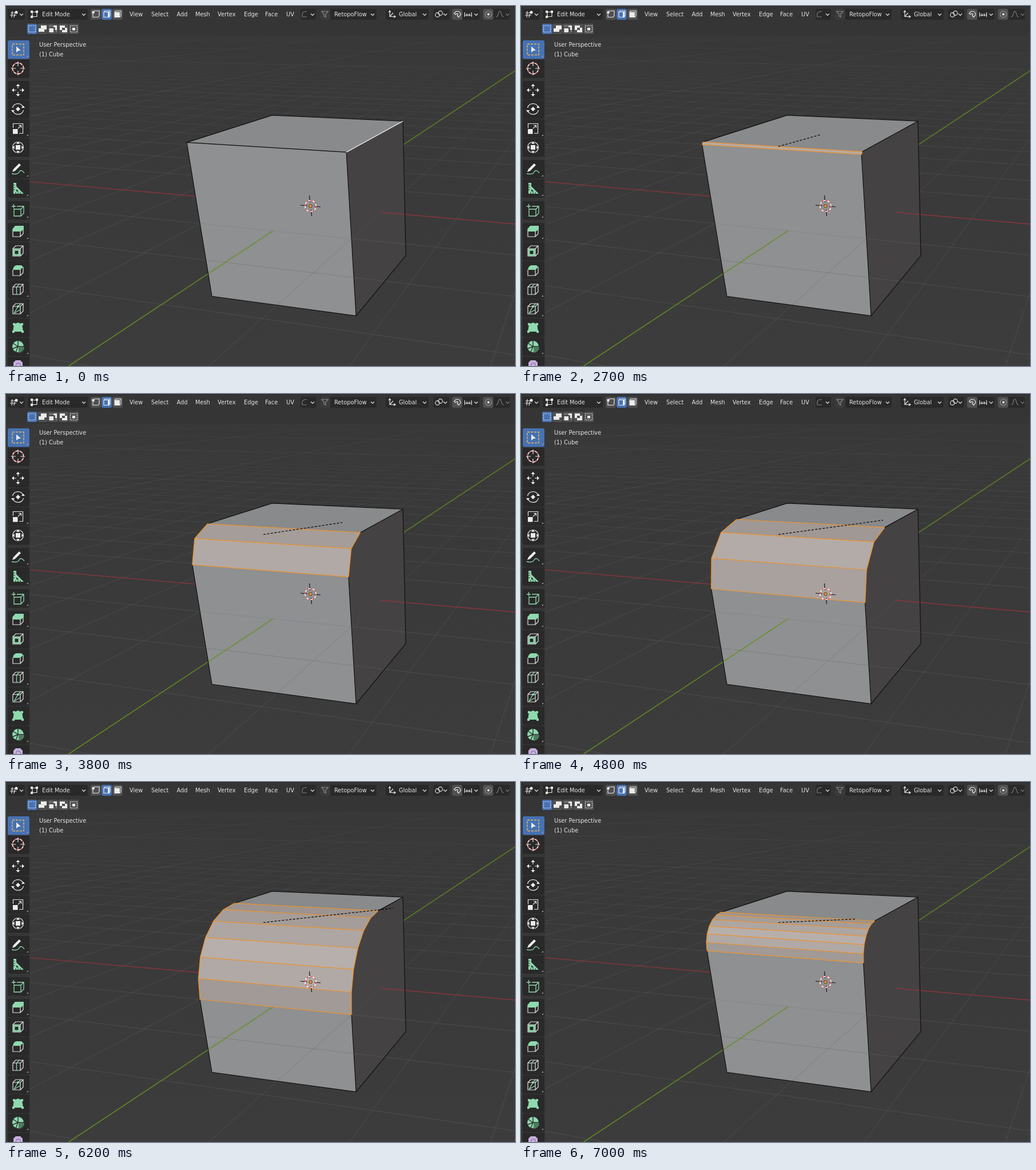
These frames come from a looping animation (890x629 px, 8000 ms). An HTML page with a canvas:

```html
<!DOCTYPE html>
<html lang="en">
<head>
<meta charset="utf-8">
<title>Bevel</title>
<style>
html, body { margin: 0; width: 100%; height: 100%; overflow: hidden; background: #393939; }
canvas, svg { position: absolute; left: 0; top: 0; }
text { font: 9.8px "DejaVu Sans", sans-serif; fill: #e6e6e6; }
.line { fill: none; stroke: #e4e4e4; stroke-width: 1.2; }
.white { fill: #ececec; }
.green { fill: #8fd9ae; }
.gline { fill: none; stroke: #8fd9ae; stroke-width: 1.3; }
.dim { opacity: .45; }
</style>
</head>
<body>
<canvas id="view" width="890" height="629"></canvas>
<svg width="890" height="629">
  <defs>
    <path id="chev" class="line" d="M-3-1.5L0 1.5 3-1.5"/>
    <path id="box" class="line" d="M-9-4H4V9H-9zM-9-4L-4-9H9V4L4 9M4-4L9-9"/>
    <g id="ring" fill="none">
      <circle r="9.7" stroke="#fff" stroke-width="1.6"/>
      <circle r="9.7" stroke="#d8434c" stroke-width="1.6" pathLength="16" stroke-dasharray="1"/>
    </g>
    <path id="arrows" class="white" d="M0-11L3.5-7H-3.5zM0 11L3.5 7H-3.5zM-11 0L-7-3.5V3.5zM11 0L7-3.5V3.5z"/>
  </defs>

  <!-- 3D cursor -->
  <g transform="translate(532.5 349.5)">
    <path d="M-2-18.500L-1-7M1 7L2 17.500M-17.500-1.500L-6-.5M7 .5L17.500 1.500" stroke="#111" stroke-width="1.2"/>
    <use href="#ring"/>
    <circle r="2.700" fill="#f59a32" stroke="#46331d"/>
  </g>

  <g id="ui"></g>

  <!-- header icons -->
  <path class="line" d="M8 12H17M7 16H18M11 9L10 20M15 14L14 20"/>
  <circle class="white" cx="18" cy="11" r="2.600"/>
  <path class="line" d="M46 10.500H54V18.500H46z"/>
  <path class="white" d="M43 8h4v4h-4zM52 8h4v4h-4zM43 17h4v4h-4z"/>
  <path class="line" d="M152 10.500L155 8.500H163V17L161 19.500H152z"/>
  <rect class="white" x="150.500" y="9" width="4" height="4"/>
  <path class="line" d="M171 10.500L173 8.500H182V17L180 19.500H171zM171 10.500H180"/>
  <path d="M179.500 10V20" stroke="#fff" stroke-width="2.500"/>
  <path class="line" d="M190 10.500L192 8.500H201V17L199 19.500"/>
  <rect class="white" x="189.500" y="10.500" width="9.500" height="9.500"/>
  <path class="line dim" d="M518 19V14Q518 9.500 526 9.500M518 19H526"/>
  <path class="line dim" d="M552 9.500H563L559 14V19.500L556 17.500V14z"/>
  <path class="line" d="M671 9V18.500H680M671 18.500L677 12M669 11L671 8 673 11M678 16.500L681 18.500 678 20.500"/>
  <circle class="line" cx="754.500" cy="15.500" r="3.800"/>
  <circle class="line" cx="759.500" cy="12.500" r="3.800"/>
  <path class="line" d="M783.500 13L787 9.500Q794 8 795 15L791.500 19.500 789 17Q792 13 787.500 13.500L786 15z"/>
  <path class="line" d="M802 11V19M802 16H814M806 13V18M810 13V18M814 11V19"/>
  <circle class="line dim" cx="843.500" cy="14.500" r="5.500"/>
  <circle class="white" cx="843.500" cy="14.500" r="2"/>
  <path class="line dim" d="M857 19C862 19 860 9 863.500 9S865 19 870 19"/>

  <!-- selection modes -->
  <rect class="line" x="39.500" y="34.500" width="12" height="11" stroke-dasharray="2 1.500"/>
  <path class="white" d="M61 34H71V41H67V45H57V39H61z"/>
  <path class="line" d="M76 35H88V45" stroke-dasharray="2 1.500"/>
  <path class="white" d="M75.500 39H83V46H75.500zM83 34H89V42H86V37H83z"/>
  <path class="white" fill-rule="evenodd" d="M94 34H103V38H107V46H98V42H94zM98 38V42H103V38z"/>
  <rect class="line" x="112.500" y="34.500" width="12" height="11" stroke-dasharray="2 1.500"/>
  <rect class="white" x="116" y="38" width="5" height="4.500"/>

  <!-- tool icons -->
  <g transform="translate(21 76)">
    <rect x="-10" y="-9.500" width="20" height="19" fill="none" stroke="#e9b75a" stroke-width="1.500" stroke-dasharray="4 2"/>
    <path class="white" d="M-3-5.500L5 1.500 1 2-3 5z"/>
  </g>
  <g transform="translate(21 109)">
    <use href="#ring"/>
    <path class="line" d="M0-12V-4M0 4V12M-12 0H-4M4 0H12"/>
  </g>
  <g transform="translate(21 147)">
    <use href="#arrows"/>
    <path class="line" d="M0-7V-3M0 3V7M-7 0H-3M3 0H7"/>
  </g>
  <g transform="translate(21 180)">
    <path class="line" d="M-9.500-2A9.700 9.700 0 0 1 9-3M9.500 2A9.700 9.700 0 0 1-9 3"/>
    <path class="white" d="M0-4L4 0 0 4-4 0zM-12 2H-6L-9 6zM12-2H6L9-6z"/>
  </g>
  <g transform="translate(21 214)">
    <path class="line" d="M-8.500-1V-8.500H8.500V8.500H2M0 0L5-5M1-5.500H5.500V-1"/>
    <rect class="white" x="-9" y="1" width="8.500" height="8.500"/>
  </g>
  <g transform="translate(21 247)">
    <circle class="line" r="9.500"/>
    <rect class="white" x="-4" y="-4" width="8" height="8"/>
    <use href="#arrows" transform="scale(.9)"/>
  </g>
  <g transform="translate(21 285)">
    <path class="white" d="M-10 5L-8 0 2-10 5-7-5 3z"/>
    <path class="gline" d="M-11 8C-4 9 0 9 2 5S8 2 11 7"/>
  </g>
  <g transform="translate(21 319)">
    <path class="green" fill-rule="evenodd" d="M-8-10H-3V-4L10 9H-8zM-3 1V5H1.500z"/>
    <path d="M-8-6H-5M-8-2H-5M-8 2H-5M-4 9V6M0 9V6M4 9V6" stroke="#292929"/>
  </g>
  <g transform="translate(22 358)">
    <path class="gline" d="M-8-3H4V9H-8zM-3-8H9V4L4 9M4-3L9-8"/>
    <path class="gline" d="M-12-8H-5M-8.500-12V-4.500" stroke-width="1.800"/>
  </g>
  <g transform="translate(21 394)">
    <use href="#box"/>
    <path class="green" d="M-9-5L-5-10H10L5-5V0H-9zM5-5L10-10V-4L5 0z"/>
  </g>
  <g transform="translate(21 428)">
    <use href="#box"/>
    <rect x="-7" y="-2" width="9" height="9" fill="none" stroke="#8fd9ae" stroke-width="3"/>
  </g>
  <g transform="translate(21 462)">
    <path class="line" d="M-9-1V9H4V-1M4 9L9 4V-6"/>
    <path class="green" d="M-9-1Q-8-8-3-9H6L9-6 4-1z"/>
  </g>
  <g transform="translate(21 495)">
    <use href="#box"/>
    <path class="gline" d="M-2.500 9V-4L2.500-9"/>
  </g>
  <g transform="translate(21 529)">
    <use href="#box"/>
    <path class="gline" d="M-7 8L0-4 5-9M-7 8L3 2"/>
    <circle class="green" cx="0" cy="-4" r="2"/>
  </g>
  <g transform="translate(21 562)">
    <path class="green" d="M-7-6L0-9 7-6 9 7H-9z"/>
    <path class="green" d="M-9-8h4v4h-4zM5-8h4v4h-4zM-10 5h4v4h-4zM6 5h4v4h-4z"/>
  </g>
  <g transform="translate(21 595)">
    <circle class="green" r="10"/>
    <path d="M0 0V-11M0 0L-9-6M0 0L-10 4M0 0L-4 10M0 0L11 0" stroke="#292929" stroke-width="1.400"/>
    <path d="M1 1H11A10 10 0 0 1 1 11z" fill="#4e7c60"/>
  </g>
  <path d="M13 629V623L17 619H25L29 623V629z" fill="#c9b0df"/>
  <path d="M17 629L19 624H24L26 629" fill="none" stroke="#7d6990"/>
</svg>
<script>
const ctx = document.getElementById('view').getContext('2d');

// ---- static interface ----
let ui = '';
const rect = (x, y, w, h, fill, r = 3) =>
  ui += `<rect x="${x}" y="${y}" width="${w}" height="${h}" rx="${r}" fill="${fill}"/>`;
const label = (x, y, s) => ui += `<text x="${x}" y="${y}">${s}</text>`;
const DARK = '#292929', GREY = '#505050', BLUE = '#4772b3';

rect(0, 0, 890, 52, '#353535', 0);
rect(0, 0, 890, 1, '#262626', 0);
rect(0, 52, 42, 577, '#373737', 0);
for (const [x, w] of [[3, 30], [38, 105], [515, 27], [550, 98], [664, 75], [747, 28], [780, 48], [834, 47]])
  rect(x, 5, w, 19, DARK);
for (const x of [148, 186, 780, 834]) rect(x, 5, 18, 19, GREY);
rect(167, 5, 18, 19, BLUE);
rect(550, 5, 17, 19, '#3b3b3b');
for (let i = 0; i < 5; i++) rect(37 + i * 18.2, 31, 17.4, 18, i ? GREY : BLUE, 2);
for (const x of [27, 136, 536, 641, 732, 768, 822, 877])
  ui += `<use href="#chev" x="${x}" y="15"${x > 870 ? ' class="dim"' : ''}/>`;
for (const [x, s] of [[63, 'Edit Mode'], [216, 'View'], [254, 'Select'], [298.5, 'Add'], [331, 'Mesh'],
  [370, 'Vertex'], [416, 'Edge'], [453, 'Face'], [490, 'UV'], [574, 'RetopoFlow'], [687, 'Global']])
  label(x, 18, s);
label(58, 71, 'User Perspective');
label(58, 88, '(1) Cube');

// tool groups: top, number of buttons
for (const [top, count] of [[60, 2], [131, 4], [269, 2], [341, 1], [379, 8]])
  for (let i = 0; i < count; i++)
    rect(3, top + i * 33.4, 38, 32.4, top + i === 60 ? BLUE : DARK);
for (const y of [89, 227, 298, 332, 370, 407, 508, 542, 608])
  ui += `<path d="M39 ${y - 3}v3h-3z" fill="#999"/>`;
document.getElementById('ui').innerHTML = ui;

// ---- scene ----
const project = ([x, y, z = 0]) => {
  const w = 1 - .03176 * x + .1103 * y - .04887 * z;
  return [(532 + 102.84 * x + 116.58 * y - 36.8 * z) / w,
          (349.8 - .678 * x + .32 * y - 142.15 * z) / w];
};
const trace = pts => pts.forEach((p, i) => ctx[i ? 'lineTo' : 'moveTo'](...project(p)));
const line = (color, width, ...pts) => {
  ctx.beginPath();
  trace(pts);
  ctx.strokeStyle = color;
  ctx.lineWidth = width;
  ctx.stroke();
};
const face = (color, pts) => {
  ctx.beginPath();
  trace(pts);
  ctx.fillStyle = color;
  ctx.fill();
};
const fade = (rgb, ...stops) => {
  const g = ctx.createLinearGradient(0, 0, 0, 629);
  for (const [y, a] of stops) g.addColorStop(y / 629, `rgba(${rgb},${a})`);
  return g;
};
const back = ctx.createLinearGradient(0, 52, 0, 629);
back.addColorStop(0, '#383838');
back.addColorStop(1, '#3c3c3c');
const fine = fade('100,100,100', [75, 0], [150, .14], [260, .3], [400, .4]);
const coarse = fade('100,100,100', [50, .03], [90, .2], [200, .36], [400, .4]);
const red = 'rgba(152,52,62,.85)';
const green = fade('100,142,32', [100, .75], [300, .8], [629, .95]);

function floor(hidden) {
  ctx.save();
  ctx.beginPath();
  ctx.rect(0, 0, 890, 629);
  trace(hidden);
  ctx.closePath();
  ctx.clip('evenodd');
  for (let k = -8; k <= 60; k++) if (k)
    line(k % 10 ? fine : coarse, 1, [-80, k], [(.9 + .1103 * k) / .03176, k]);
  for (let k = -60; k <= 6; k++) if (k)
    line(k % 10 ? fine : coarse, 1, [k, (.03176 * k - .9) / .1103], [k, 70]);
  line(red, 1.3, [-40, 0], [20, 0]);
  line(green, 1.6, [0, -7], [0, 60]);
  ctx.restore();
}

// brightness of a selected strip by its tilt in degrees
const shades = [[0, 154], [15, 169], [32, 187], [55, 172], [75, 160], [90, 152]];
const mix = (a, b, f) => a + (b - a) * f;
function shade(deg) {
  const i = shades.findIndex(s => s[0] > deg), [a, va] = shades[i - 1], [b, vb] = shades[i];
  const v = Math.round(mix(va, vb, (deg - a) / (b - a)));
  return `rgb(${v},${v - 8},${v - 12})`;
}

// time, segments, bevel width, pointer x, pointer y
const keys = [
  [2300, 0, 0, 515, 224], [2600, 0, 0, 515, 224],
  [2700, 1, .025, 525, 224], [3200, 1, .41, 588, 224],
  [3800, 2, .41, 588, 224], [4000, 3, .41, 588, 224], [4300, 3, .41, 588, 224],
  [4800, 3, .71, 633, 220], [5300, 4, .71, 633, 220], [5400, 4, .68, 630, 222], [5500, 4, .68, 630, 222],
  [5600, 4, .645, 626, 223], [5700, 5, .62, 622, 223], [5900, 6, .7, 636, 222],
  [6200, 6, 1, 678, 220], [6300, 6, 1, 678, 220],
  [6800, 6, .35, 579, 240], [7000, 6, .388, 586, 239], [8000, 6, .388, 586, 239]
];
function pose(t) {
  const i = keys.findIndex(k => k[0] > t), a = keys[i - 1], b = keys[i];
  if (!a) return [0, 0];
  const f = (t - a[0]) / (b[0] - a[0]);
  return [a[1], ...[2, 3, 4].map(j => mix(a[j], b[j], f))];
}

function draw(t) {
  const [n, d, mx, my] = pose(t);
  const profile = x => Array.from({ length: n + 1 }, (_, i) => {
    const a = n ? i / n * Math.PI / 2 : 0;
    return [x, -1 + d - d * Math.cos(a), 1 - d + d * Math.sin(a)];
  });
  const left = profile(-1), right = profile(1);
  const [C, D, E, F, G] = [[1, -1, -1], [-1, -1, -1], [-1, 1, 1], [1, 1, 1], [1, 1, -1]];

  ctx.fillStyle = back;
  ctx.fillRect(0, 0, 890, 629);
  face('#888a8b', [left[n], right[n], F, E]);
  face('#454244', [...right, F, G, C]);
  face('#8e9091', [left[0], right[0], C, D]);
  for (let i = 0; i < n; i++)
    face(shade((i + .5) / n * 90), [left[i], right[i], right[i + 1], left[i + 1]]);
  floor([[-1, -1, 0], ...left, E, F, [1, 1, 0], [1, -1, 0]]);

  line('#0c0c0c', 1.1, left[n], E, F, G, C, D, left[0]);
  line('#0c0c0c', 1.1, C, right[0]);
  line(t < 1400 ? '#fff' : '#0c0c0c', 1.2, right[n], F);
  if (n) {
    const orange = '#ee9430';
    for (let i = 0; i <= n; i++) line(orange, 1.2, left[i], right[i]);
    line(orange, 1.3, ...left);
    line(orange, 1.3, ...right);
  } else line(t < 1400 ? '#0c0c0c' : '#fff', 1.2, left[0], right[0]);

  if (mx) {
    ctx.beginPath();
    ctx.moveTo(450, 245.5);
    ctx.lineTo(mx, my + .5);
    ctx.setLineDash([4, 2.5]);
    ctx.strokeStyle = '#050505';
    ctx.lineWidth = 1.2;
    ctx.stroke();
    ctx.setLineDash([]);
  }
}

function tick() {
  draw(Math.floor(performance.now() % 8000 / 100) * 100);
  requestAnimationFrame(tick);
}
tick();
</script>
</body>
</html>
```
